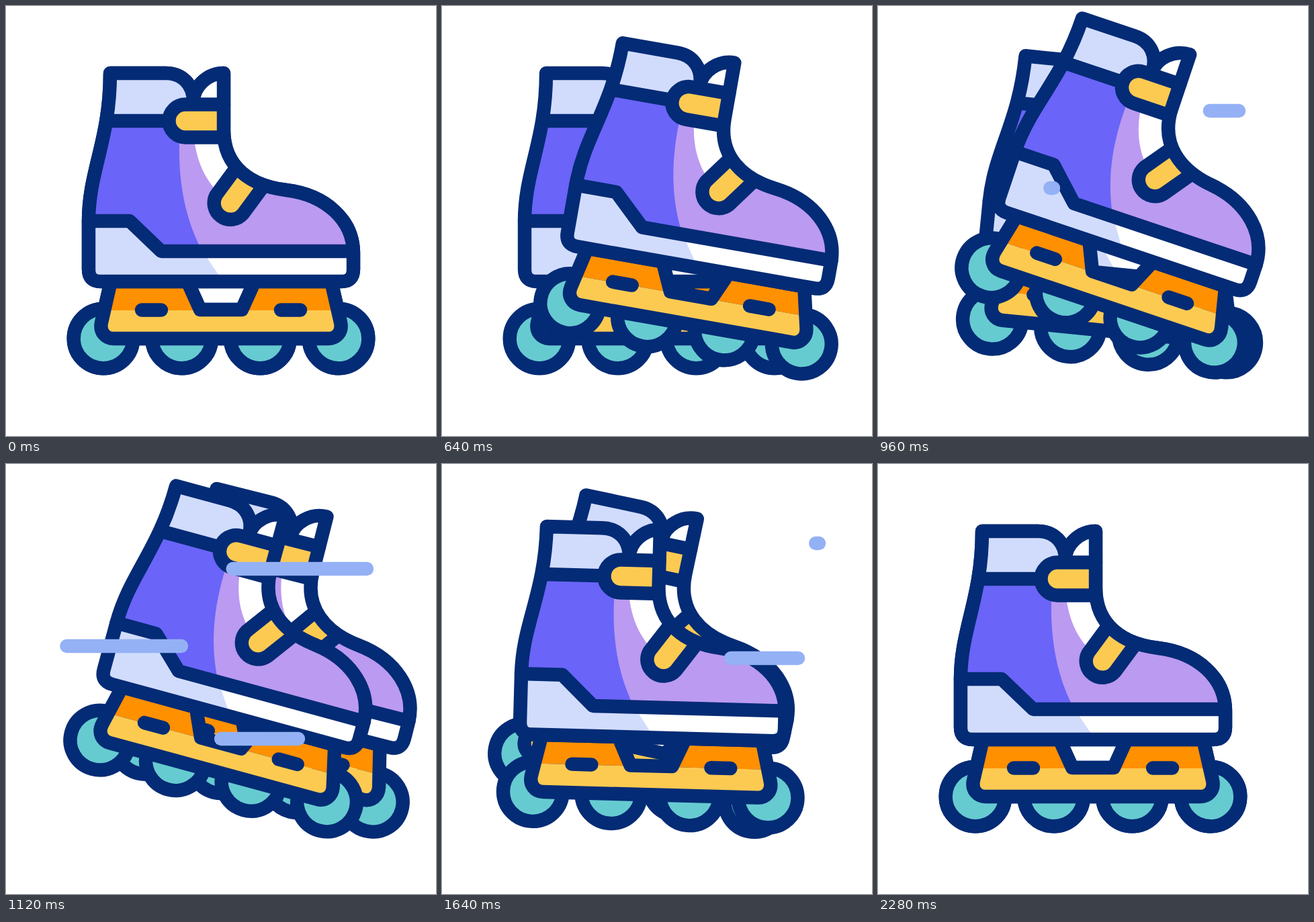
Recreate the animation shown at these times as an HTML page. Size 640 by 640 pixels, loop 2440 ms.

```html
<!DOCTYPE html>
<html lang="en">
<head>
<meta charset="utf-8">
<title>Roller skates</title>
<style>
  html, body { margin: 0; width: 100%; height: 100%; overflow: hidden; background: #fff; }
  svg { display: block; width: 100%; height: 100%; }
  .ink { stroke: #042b75; stroke-width: 20.4; stroke-linecap: round; stroke-linejoin: round; }
</style>
</head>
<body>
<svg viewBox="0 0 640 640">
  <defs>
    <path id="boot" d="M155 100H238C262 100 279 117 279 142C279 120 300 100 324 100V185C324 240 365 268 417 274C475 281 517 318 517 368V392Q517 410 499 410H141Q123 410 123 392V320C123 245 155 200 155 100Z"/>
    <path id="frame" d="M156 410L142 471C139 485 148 495 160 495H480C492 495 501 485 498 471L484 410H370L351 452H289L270 410Z"/>
    <clipPath id="inBoot"><use href="#boot"/></clipPath>
    <clipPath id="inFrame"><use href="#frame"/></clipPath>
    <g id="skate">
      <g id="wheels" class="ink" fill="#66cbd0"></g>
      <g clip-path="url(#inFrame)">
        <path fill="#ff9000" d="M120 400H520V453H120Z"/>
        <path fill="#fdca51" d="M120 453H520V500H120Z"/>
      </g>
      <g class="ink" fill="none">
        <use href="#frame"/>
        <path d="M202 452.500H231M409 452.500H438"/>
      </g>
      <g clip-path="url(#inBoot)">
        <path fill="#fff" d="M100 80H540V420H100Z"/>
        <path fill="#bb9af1" d="M250 190H279C283 230 295 255 314 276L400 240H540V365H250Z"/>
        <path fill="#6a64f8" d="M100 171H260C253 250 264 312 292 365H100Z"/>
        <path fill="#d1dcfd" d="M100 80H279V171H100ZM100 320H184L232 365H293Q303 381 320 405V420H100Z"/>
        <path fill="#fff" d="M279 142C279 120 300 100 324 100V150H279Z"/>
      </g>
      <g class="ink" fill="none">
        <path d="M153 171H243M123 320H184L231 365H517"/>
        <path fill="#fdca51" d="M324 146.500H267A24.500 24.500 0 0 0 267 195.500H324"/>
        <path fill="#fdca51" d="M341 243L313 281A24.500 24.500 0 0 0 353 309L381 271"/>
        <use href="#boot"/>
      </g>
    </g>
  </defs>
  <use id="back" href="#skate"/>
  <use id="front" href="#skate"/>
  <g id="streaks" stroke="#94b1f5" stroke-width="20.4" stroke-linecap="round"></g>
</svg>
<script>
const LOOP = 2440, STEP = 40, LAST = 2280;
const STRIDE_DELAY = 400, SQUASH_TIME = 440;
const LENGTH = 200, GROW = 240, TRAIL = 267;

// Wind streaks: start time, right end, y
const streaks = [
  [888, 537, 156], [938, 261, 271], [988, 435, 409],
  [1520, 530, 289], [1618, 561, 118], [1668, 235, 404]
];

const $ = id => document.getElementById(id);
const clamp = u => Math.max(0, Math.min(1, u));
const smooth = u => u * u * (3 - 2 * u);
const mix = (a, b, u) => a + (b - a) * u;

// Eased progress from a to b; soft 0 is linear, 1 is smooth
function ramp(t, a, b, soft = 1) {
  const u = clamp((t - a) / (b - a));
  return mix(u, smooth(u), soft);
}

function add(parent, name, attrs) {
  const node = document.createElementNS("http://www.w3.org/2000/svg", name);
  set(node, attrs);
  return $(parent).appendChild(node);
}

function set(node, attrs) {
  for (const key in attrs) node.setAttribute(key, attrs[key]);
}

for (let i = 0; i < 4; i++) {
  add("wheels", "circle", { cx: 145 + i * 350 / 3, cy: 495, r: 44.3 });
}
const lines = streaks.map(([, , y]) => add("streaks", "line", { y1: y, y2: y }));

// The leg swings forward while the heel lifts, then slides back and levels out
function place(id, t, squash) {
  const x = 165 * (ramp(t, 380, 820) - ramp(t, 820, 1410, 0));
  const angle = 19.4 * (ramp(t, 370, 900) - ramp(t, 900, 1740, 0.5));
  set($(id), {
    transform: `translate(${x} 0) rotate(${angle} 416 130) ` +
      `translate(0 ${550 * (1 - squash)}) scale(1 ${squash})`
  });
}

function draw(t) {
  const squash = 1 - 0.038 * Math.sin(Math.PI * clamp(t / SQUASH_TIME)) ** 2;
  place("back", t - STRIDE_DELAY, squash);
  place("front", t, squash);
  streaks.forEach(([start, x], i) => {
    const head = ramp(t, start, start + GROW);
    const tail = ramp(t, start + TRAIL, start + TRAIL + GROW);
    set(lines[i], {
      x1: x - LENGTH * tail,
      x2: x - LENGTH * head,
      display: head > tail ? "inline" : "none"
    });
  });
}

const begin = performance.now();
function tick() {
  const t = (performance.now() - begin) % LOOP;
  draw(Math.min(LAST, Math.floor(t / STEP) * STEP));
  requestAnimationFrame(tick);
}
tick();
</script>
</body>
</html>
```
